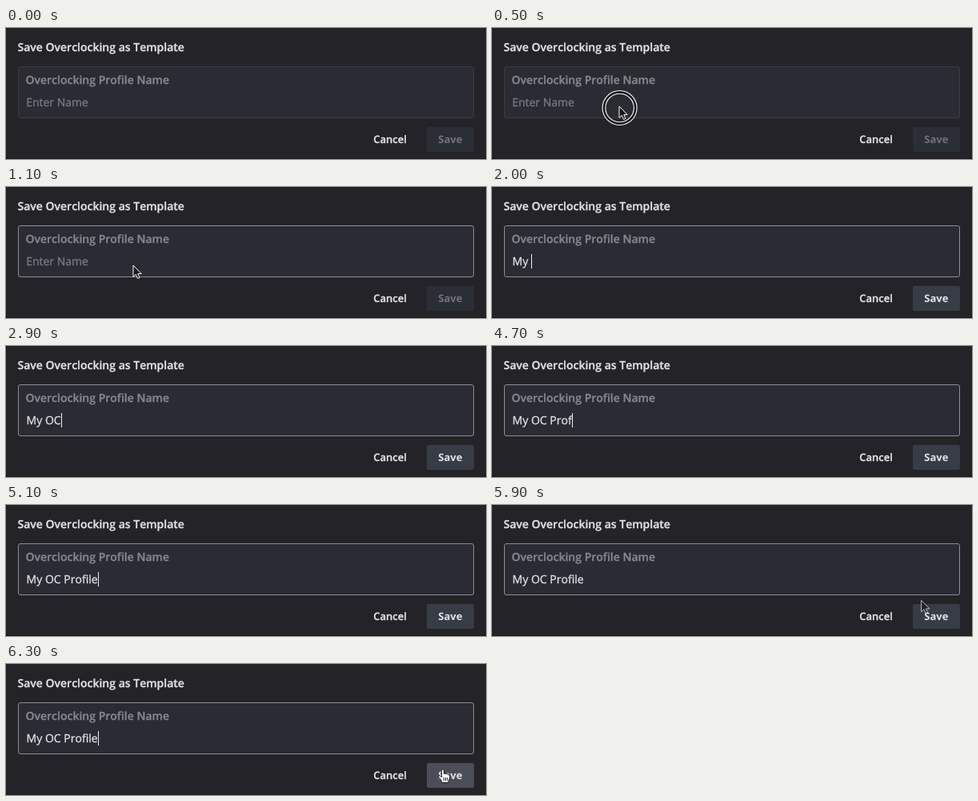
Recreate the animation shown at these times as an HTML page. Size 600 px wide and 164 px high, loop 6.5 s.

```html
<!DOCTYPE html>
<html lang="en">
<head>
<meta charset="utf-8">
<title>Save as template</title>
<style>
  html, body { margin: 0; width: 100%; height: 100%; overflow: hidden; background: #1a1a1d; }
  svg { display: block; width: 600px; height: 164px; }
  text {
    font: 14px "Open Sans", "Noto Sans", sans-serif;
    font-kerning: none; font-variant-ligatures: none;
    text-rendering: geometricPrecision; white-space: pre;
    color: #e4e4e6; fill: currentColor; stroke: currentColor; stroke-width: .3px;
  }
  .strong { font-weight: 600; }
  .label { color: #87888e; }
  .hint { color: #7a7b81; }
  .action { font-size: 13px; font-weight: 600; }
  #saveText { font-weight: 700; text-anchor: middle; stroke: none; }
</style>
</head>
<body>
<svg viewBox="0 0 600 164">
  <rect width="600" height="163" rx="4" fill="#242428"/>
  <text class="strong" x="14.5" y="29">Save Overclocking as Template</text>
  <rect id="field" x="15.5" y="48.5" width="569" height="64" rx="2.5" fill="#2a2b33"/>
  <text class="strong label" x="24.5" y="70">Overclocking Profile Name</text>
  <text id="hint" class="hint" x="25.2" y="98">Enter Name</text>
  <text id="typed" x="25.6" y="98"></text>
  <rect id="caret" y="84" width="1" height="18" fill="#f0f0f0"/>
  <text class="action" x="459.2" y="144">Cancel</text>
  <rect id="saveBox" x="526" y="124" width="59" height="31" rx="2.5"/>
  <text id="saveText" class="action" x="555.3" y="144">Save</text>

  <g id="ring" fill="none">
    <circle r="20" stroke="#111114" stroke-width="4"/>
    <circle r="21.5" stroke="#fff" stroke-width="1.1"/>
    <circle r="17.8" stroke="#fff" stroke-width="1.1"/>
  </g>
  <path id="arrow" d="M0 0V14.5L3.3 11.4 5.6 16.5 8 15.4 5.8 10.6H10.2Z"
        fill="#17171a" stroke="#fff" stroke-linejoin="round"/>
  <g id="hand" stroke="#1c1c20" stroke-width="1" stroke-linejoin="round" stroke-linecap="round">
    <path fill="#fff" d="M-1.5 1.5Q0 -1 1.5 1.5V6Q3 4.8 4.2 6.4 5.8 5.6 6.7 7.2 8.6 6.8 8.8 8.6V11.5L7.2 14.5V17H-1.4V15L-5.3 9.8Q-5.4 7.4 -3.2 8.4L-1.5 10Z"/>
    <path fill="none" d="M1.2 11V14.3M3.4 11V14.3M5.6 11V14.3"/>
  </g>
</svg>
<script>
const LOOP = 6500, TICK = 100, FOCUS = 600;
const NAME = "My OC Profile";
const KEYS = [1400, 1800, 2000, 2400, 2900, 3300, 3700, 4100, 4200, 4700, 4800, 5000, 5100];
const FIELD_POINT = [159, 98];

const el = {};
document.querySelectorAll("[id]").forEach(node => el[node.id] = node);

const show = (node, on) => node.setAttribute("visibility", on ? "visible" : "hidden");
const clamp = v => Math.min(1, Math.max(0, v));
const easeOut = v => 1 - (1 - clamp(v)) ** 2;
const lerp = (a, b, p) => a + (b - a) * p;
const mix = (a, b, p) => a.map((v, i) => lerp(v, b[i], p));
const rgb = c => `rgb(${c.map(Math.round)})`;
const place = (node, [x, y], scale = 1) =>
  node.setAttribute("transform", `translate(${x} ${y}) scale(${scale})`);

// Pointer goes to the field, hides while typing, then goes to the button.
function pointerAt(t) {
  if (t < 1400) return mix([205, 19], FIELD_POINT, easeOut((t - 100) / 400));
  return mix([525, 104], [546, 131.5], easeOut((t - 5700) / 600));
}

function drawField(t) {
  const count = KEYS.filter(k => k <= t).length;
  const lastKey = count ? KEYS[count - 1] : FOCUS;
  el.field.setAttribute("stroke", t < FOCUS ? "#3c3d45" : "#8d8d93");
  show(el.hint, !count);
  el.typed.textContent = NAME.slice(0, count);
  const width = count ? el.typed.getComputedTextLength() : 0;
  el.caret.setAttribute("x", Math.floor(26.35 + width));
  show(el.caret, t >= FOCUS && Math.floor((t - lastKey) / 500) % 2 === 0);
}

function drawButton(t) {
  const enabled = clamp((t - 1300) / 300);
  const hover = clamp((t - 6000) / 300);
  const fill = mix(mix([43, 46, 52], [55, 60, 70], enabled), [75, 77, 88], hover);
  el.saveBox.setAttribute("fill", rgb(fill));
  el.saveText.style.color = rgb(mix([112, 115, 121], [228, 228, 231], enabled));
}

function drawPointer(t) {
  const point = pointerAt(t);
  const visible = (t >= 100 && t < 1400) || t >= 5800;
  const overButton = t >= 5800 && point[1] >= 124;
  place(el.arrow, point);
  place(el.hand, point);
  place(el.ring, [159.6, 100], t < 500 ? 1.09 : 1);
  el.arrow.setAttribute("opacity", t < 5800 ? 1 : clamp((t - 5700) / 300));
  show(el.arrow, visible && !overButton);
  show(el.hand, visible && overButton);
  show(el.ring, t >= 400 && t < FOCUS);
}

function draw(t) {
  drawField(t);
  drawButton(t);
  drawPointer(t);
}

const start = performance.now();
function frame() {
  const elapsed = (performance.now() - start) % LOOP;
  draw(Math.floor(elapsed / TICK) * TICK);
  requestAnimationFrame(frame);
}
frame();
</script>
</body>
</html>
```
